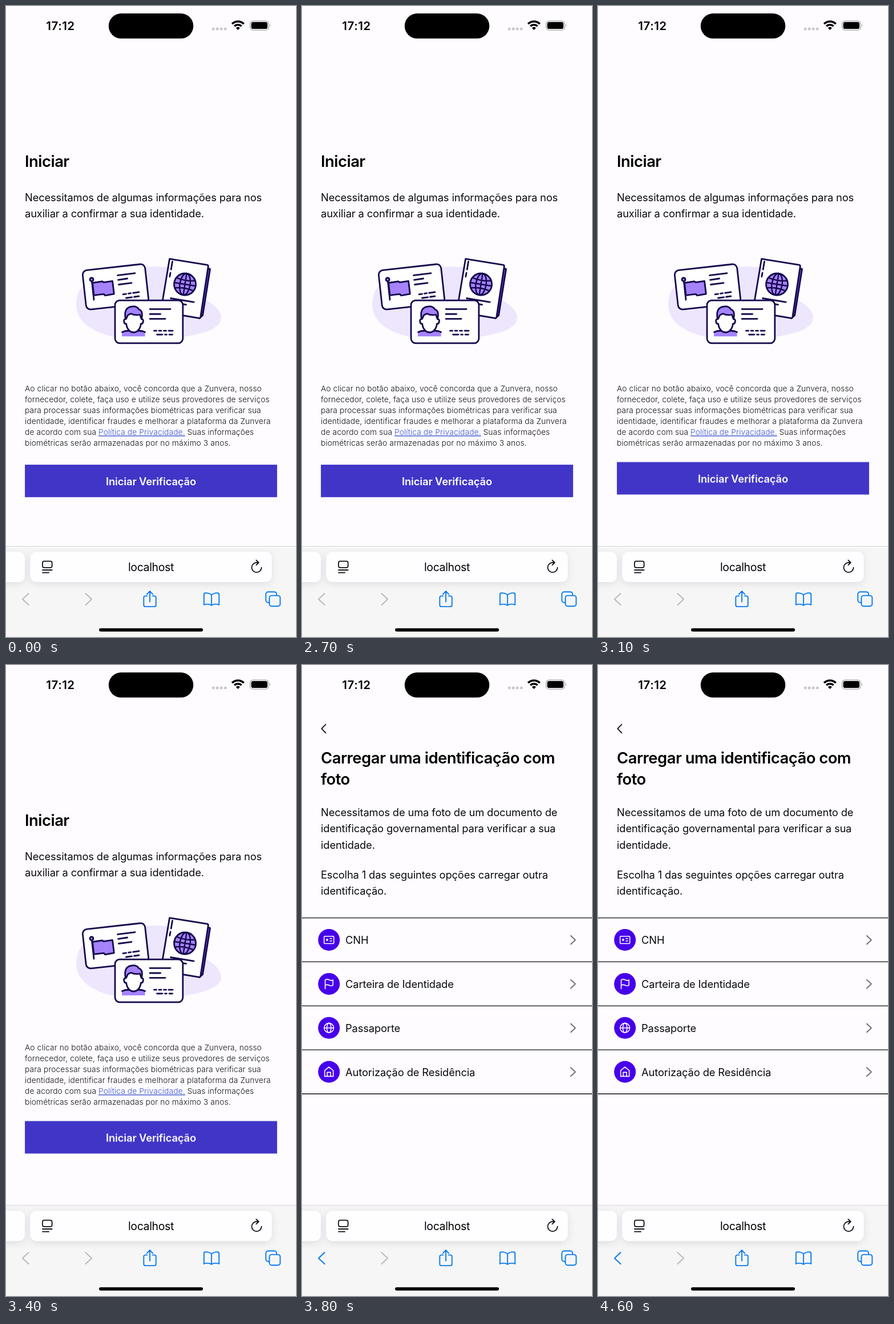
These frames come from a looping animation (508x1102 px, 6800 ms). An HTML page:

```html
<!DOCTYPE html>
<html lang="pt-BR">
<head>
<meta charset="utf-8">
<title>Verificação</title>
<style>
html, body { margin: 0; width: 100%; height: 100%; overflow: hidden; background: #fefcff; }
svg { display: block; width: 100%; height: 100%; }
text {
  font-family: Inter, "Liberation Sans", sans-serif;
  font-optical-sizing: none;
  white-space: pre;
}
.body { font-size: 18.3px; letter-spacing: -.115px; fill: #09090b; }
.title { font-size: 27.4px; font-weight: 600; letter-spacing: -.5px; }
.small { font-size: 13.75px; font-weight: 300; letter-spacing: .13px; fill: #111; }
.link { fill: #3c56cc; text-decoration: underline; }
.label { font-size: 18.3px; font-weight: 600; letter-spacing: -.1px; fill: #fff; text-anchor: middle; }
.host { font-size: 19.4px; letter-spacing: -.3px; text-anchor: middle; }
.clock { font-size: 20.5px; font-weight: 600; letter-spacing: .5px; text-anchor: middle; }
.line { fill: none; stroke-linecap: round; stroke-linejoin: round; }
.ink { stroke: #150a4d; stroke-width: 2.8; }
.blue { stroke: #087bed; stroke-width: 1.9; }
.grey { stroke: #bababd; stroke-width: 2; }
.white { stroke: #fff; stroke-width: 1.6; }

/* 3100 ms: button lifts, 3700 ms: history grows, 3800 ms: next page */
.start, .choose, .button, .back { animation: 6.8s step-end infinite; }
.start { animation-name: leave; }
.choose { animation-name: enter; }
.button { animation-name: lift; }
.back { animation-name: enable; }
@keyframes leave { 0% { visibility: visible; } 55.88%, 100% { visibility: hidden; } }
@keyframes enter { 0% { visibility: hidden; } 55.88%, 100% { visibility: visible; } }
@keyframes lift { 0% { transform: translateY(0); } 45.58%, 100% { transform: translateY(-4.6px); } }
@keyframes enable { 0% { stroke: #bababd; } 54.41%, 100% { stroke: #087bed; } }
</style>
</head>
<body>
<svg viewBox="0 0 508 1102" preserveAspectRatio="none">
  <defs>
    <filter id="shadow" x="-10%" y="-40%" width="120%" height="190%">
      <feDropShadow dx="0" dy="3" stdDeviation="7" flood-color="#000" flood-opacity=".1"/>
    </filter>
  </defs>
  <rect width="508" height="1102" fill="#fefcff"/>

  <g class="start">
    <text class="title" x="33" y="281">Iniciar</text>
    <text class="body" x="33" y="340.5">Necessitamos de algumas informações para nos</text>
    <text class="body" x="33" y="368.8">auxiliar a confirmar a sua identidade.</text>

    <path fill="#ede6fd" d="M123 520C124 487 148 472 195 464C230 456 262 453 287 457C317 463 325 490 345 510C362 520 377 530 377 546C376 562 350 572 310 578H190C150 570 122 550 123 520Z"/>

    <g class="line ink">
      <g transform="translate(133.5 462.2) rotate(-6.3)">
        <rect width="110" height="69" rx="8" fill="#fff"/>
      </g>
      <path fill="#a683fb" d="M151.5 483.5L169 481L171 482.6L186.5 480.3L189.3 502.8L173.5 505.6L171.5 503.2L154 505.2Z"/>
      <path d="M150.3 480L154 513"/>
      <circle cx="150" cy="477.7" r="3" fill="#a683fb"/>
      <path d="M195.5 470.3L226 466.6M196.5 478.3L212.5 476M197.5 486.5L220 483.6"/>
      <path d="M205 503.6l5.5-.8m4-.6l4-.5m4-.6l10.5-1.5M210.5 510l10-1.4m4-.6l8.5-1.2"/>

      <path fill="#7647e0" d="M351 456.5L357.5 459.5L344.5 540.5L339 545Z"/>
      <path fill="#fff" d="M286.5 441.7L352.2 452.2Q354.6 452.7 354.2 455L340.8 543Q340.3 545.6 338 545.2L271 534Z"/>
      <path d="M291.5 446.5L289.2 460M288 466L286.8 472.5M288.5 510.5L329 517.2M299 518.8L315.5 521.6"/>
      <circle cx="313.5" cy="486" r="19" fill="#a683fb"/>
      <g transform="translate(313.5 486) rotate(9)" stroke-width="2.4">
        <ellipse rx="9" ry="19"/>
        <path d="M0-19V19M-19 0H19M-16.5-9Q0-5 16.5-9M-16.5 9Q0 5 16.5 9"/>
      </g>

      <rect x="191" y="514.2" width="118.8" height="74.6" rx="8" fill="#fff"/>
      <path fill="#a683fb" stroke="none" d="M203 577V569.5Q211 566.5 217 567H230Q236 566.5 243.5 569.5V577Z"/>
      <path d="M203.5 569.5Q210 566.5 217 567.5M243.5 569.5Q237 566.5 230 567.5"/>
      <path fill="#fff" d="M209.5 546.5Q206 547 206.7 551.2Q207.4 555.4 210.6 555C212 565 217.5 570 223.5 570S235 565 236.4 555Q239.6 555.4 240.3 551.2Q241 547 237.5 546.5V536H209.5Z"/>
      <path fill="#a683fb" d="M209.6 547C206.5 533 211 526 220 525Q229 523.5 232.5 529.5C238.5 531.5 239.5 538 237.4 547Q236 543.5 234.6 539Q226 541 219 537.3Q213.5 538.5 212.3 542.5Q211.5 545.5 209.6 547Z"/>
      <path d="M252 529.3H288M252 538H270.5M252 546.3H279"/>
      <path d="M259.5 567.2h4m4.5 0h4m4.5 0h4m4.5 0h7M264.5 573.8h9.5m4.5 0h3m4.5 0h5.5"/>
    </g>

    <g class="small">
      <text x="33" y="673.4">Ao clicar no botão abaixo, você concorda que a Zunvera, nosso</text>
      <text x="33" y="692.4">fornecedor, colete, faça uso e utilize seus provedores de serviços</text>
      <text x="33" y="711.3">para processar suas informações biométricas para verificar sua</text>
      <text x="33" y="730.2">identidade, identificar fraudes e melhorar a plataforma da Zunvera</text>
      <text x="33" y="749.1">de acordo com sua</text>
      <text x="162" y="749.1" class="link">Política de Privacidade.</text>
      <text x="317.5" y="749.1">Suas informações</text>
      <text x="33" y="768">biométricas serão armazenadas por no máximo 3 anos.</text>
    </g>

    <g class="button">
      <rect x="33.1" y="801.1" width="441.8" height="56.7" fill="#4135c8"/>
      <text class="label" x="254" y="836.7">Iniciar Verificação</text>
    </g>
  </g>

  <g class="choose">
    <path class="line" stroke="#111" stroke-width="1.8" d="M41.5 103.8L34.3 111.2L41.5 118.6"/>
    <text class="title" x="33" y="171.5">Carregar uma identificação com</text>
    <text class="title" x="33" y="209.4">foto</text>
    <g class="body">
      <text x="33" y="264">Necessitamos de uma foto de um documento de</text>
      <text x="33" y="292.3">identificação governamental para verificar a sua</text>
      <text x="33" y="320.6">identidade.</text>
      <text x="33" y="372.8">Escolha 1 das seguintes opções carregar outra</text>
      <text x="33" y="401.1">identificação.</text>
      <text x="76" y="487.2">CNH</text>
      <text x="76" y="564">Carteira de Identidade</text>
      <text x="76" y="640.8">Passaporte</text>
      <text x="76" y="717.6">Autorização de Residência</text>
    </g>
    <path stroke="#111" stroke-width="1.3" d="M0 441.6H508M0 518.4H508M0 595.3H508M0 672.1H508M0 749H508"/>
    <g fill="#4600eb">
      <circle cx="47.2" cy="480" r="19"/>
      <circle cx="47.2" cy="556.9" r="19"/>
      <circle cx="47.2" cy="633.7" r="19"/>
      <circle cx="47.2" cy="710.5" r="19"/>
    </g>
    <path class="line" stroke="#73737d" stroke-width="2" d="M470.8 472.8l8 7.4l-8 7.4M470.8 549.7l8 7.4l-8 7.4M470.8 626.5l8 7.4l-8 7.4M470.8 703.3l8 7.4l-8 7.4"/>
    <g class="line white">
      <rect x="38.7" y="473.7" width="17" height="12.8" rx="1.2"/>
      <circle cx="44" cy="480" r="1.9" fill="#fff" stroke="none"/>
      <path d="M49 478H52.3M49 482H52.3"/>
      <path d="M40.6 565.5V550.2Q44 547.8 47.4 549.8T54.2 550V559.3Q50.8 561.2 47.4 559.3T40.6 559.5"/>
      <circle cx="47.2" cy="633.7" r="8.3"/>
      <ellipse cx="47.2" cy="633.7" rx="3.7" ry="8.3"/>
      <path d="M38.9 633.7H55.5"/>
      <path d="M39.7 708.2L47.2 702.2L54.7 708.2V718.4H39.7ZM44.2 718.4V711.4H50.2V718.4"/>
    </g>
  </g>

  <text class="clock" x="95.5" y="42">17:12</text>
  <rect x="179.8" y="13.1" width="148.4" height="43.7" rx="21.85"/>
  <g fill="#c6c5c9">
    <rect x="361" y="37.8" width="4.4" height="4.4" rx="1.2"/>
    <rect x="368" y="37.8" width="4.4" height="4.4" rx="1.2"/>
    <rect x="375" y="37.8" width="4.4" height="4.4" rx="1.2"/>
    <rect x="382" y="37.8" width="4.4" height="4.4" rx="1.2"/>
    <path d="M461.6 31.4Q463.6 32.3 463.6 34.1T461.6 36.8Z"/>
  </g>
  <path fill="none" stroke="#000" stroke-width="3.7" d="M396.05 31.25A14.5 14.5 0 0 1 416.55 31.25M400.1 35.3A8.8 8.8 0 0 1 412.5 35.3"/>
  <path d="M406.3 42L402.8 38.3A5 5 0 0 1 409.8 38.3Z"/>
  <rect x="427.6" y="26.1" width="32.4" height="16" rx="5" fill="none" stroke="#a5a4a8" stroke-width="1.3"/>
  <rect x="429.6" y="28.1" width="28.4" height="12" rx="3.4"/>

  <rect y="943" width="508" height="159" fill="#f6f6f7"/>
  <rect y="943" width="508" height="1" fill="#d9d8db"/>
  <g fill="#fefdff" filter="url(#shadow)">
    <rect x="-40" y="953" width="73" height="53" rx="11.5"/>
    <rect x="42.5" y="953" width="423" height="53" rx="11.5"/>
  </g>
  <text class="host" x="254" y="987">localhost</text>
  <g class="line" stroke="#111" stroke-width="1.8">
    <rect x="64" y="969.7" width="16.6" height="11.2" rx="2.8"/>
    <path d="M64 985H80.6M64 989.7H75"/>
    <path d="M447.6 980.6A8.6 8.6 0 1 1 439 972H442M438.3 967.8L442.6 972L438.3 976.3"/>
  </g>
  <path class="line grey back" d="M39.6 1026L29 1036L39.6 1046"/>
  <path class="line grey" d="M139.5 1026L150 1036L139.5 1046"/>
  <g class="line blue">
    <path d="M247.2 1030.4H244Q241.3 1030.4 241.3 1033V1046.2Q241.3 1048.9 244 1048.9H260Q262.7 1048.9 262.7 1046.2V1033Q262.7 1030.4 260 1030.4H256.8"/>
    <path d="M252 1040.5V1022.3M246.8 1027.3L252 1022L257.2 1027.3"/>
    <path d="M360 1028.6Q355.5 1024.6 349 1025.2Q346.8 1025.4 346.8 1027.6V1045.8Q355 1043 360 1046.8Q365 1043 373.2 1045.8V1027.6Q373.2 1025.4 371 1025.2Q364.5 1024.6 360 1028.6V1046.8"/>
    <rect x="455.2" y="1023.2" width="18.8" height="18.6" rx="4"/>
    <rect x="461.4" y="1029.6" width="18.9" height="18.6" rx="4" fill="#f6f6f7"/>
  </g>
  <rect x="163" y="1086.8" width="182" height="5.6" rx="2.8"/>
</svg>
</body>
</html>
```
